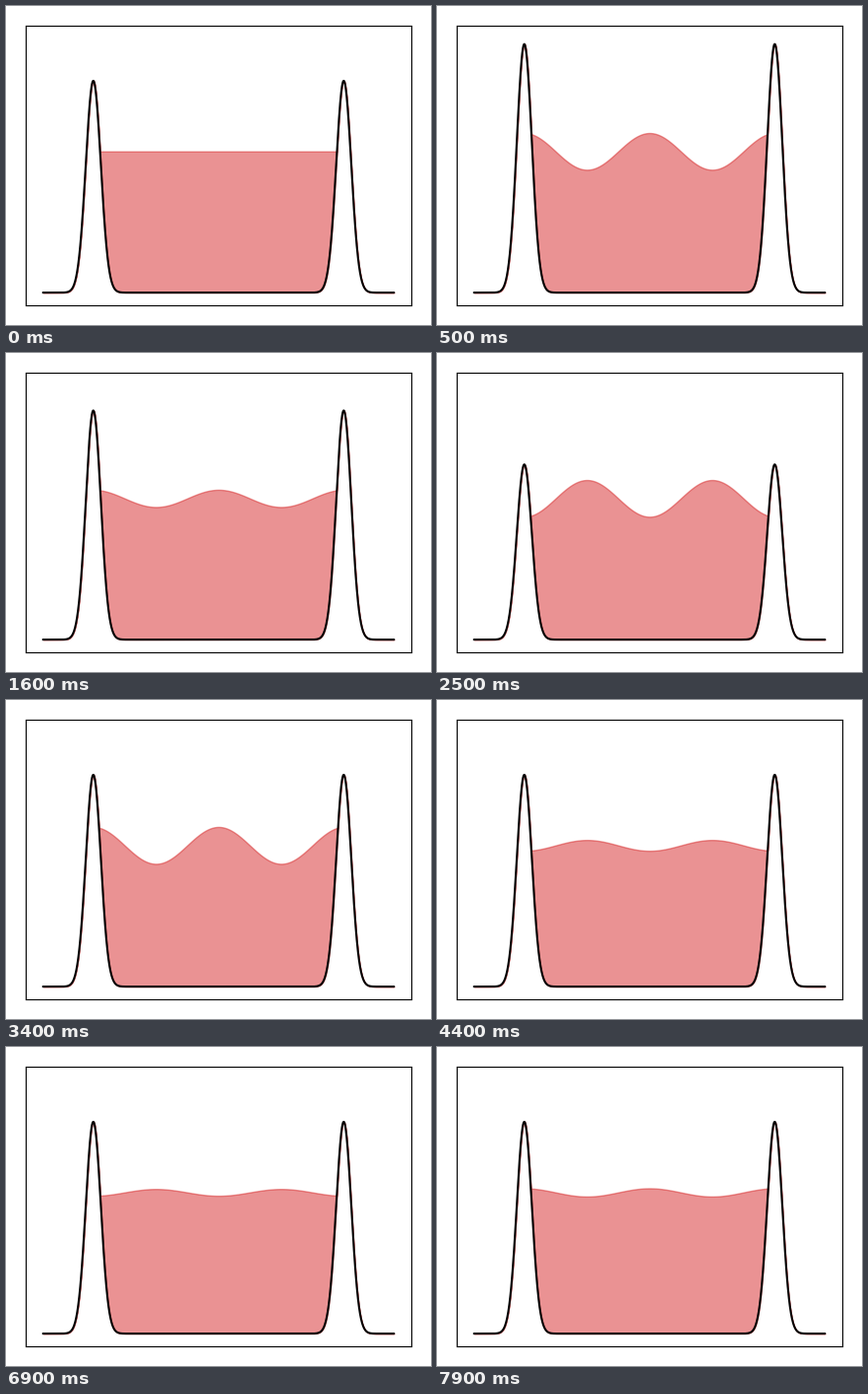
Animation of 432x324 px, one loop 8000 ms. Source, as a matplotlib script:

```python
import numpy as np
import matplotlib.pyplot as plt
from matplotlib.animation import FuncAnimation

W, H, DPI = 432, 324, 100
MARGIN = 20          # px around the axes
FRAMES, INTERVAL = 80, 100
PERIOD = 1.5         # s, drive and wave
DRIVE_END = 3.0      # s, two full periods
DECAY = 3.0          # s, damping after the drive stops
WALL, SIGMA = 1.5, 0.03
RIPPLE = 0.15

x = np.linspace(-0.2, 1.2, 1401)
walls = sum(np.exp(-((x - c) / SIGMA) ** 2 / 2) for c in (0, 1))
inside = (x > 0) & (x < 1)
mode = np.cos(4 * np.pi * x)


def state(t):
    """Potential and filled level at time t in seconds."""
    swing = np.sin(2 * np.pi * t / PERIOD)
    driven = t < DRIVE_END
    potential = WALL * walls * (1 + 0.2 * swing * driven)
    damping = 1 if driven else np.exp(-(t - DRIVE_END) / DECAY)
    level = 1 + RIPPLE * damping * swing * mode
    return potential, np.where(inside, np.maximum(potential, level), potential)


def outline(low, high):
    return np.column_stack([np.r_[x, x[::-1]], np.r_[low, high[::-1]]])


fig = plt.figure(figsize=(W / DPI, H / DPI), dpi=DPI, facecolor="white")
ax = fig.add_axes([MARGIN / W, MARGIN / H, 1 - 2 * MARGIN / W, 1 - 2 * MARGIN / H])
ax.set(xlim=(-0.27, 1.27), ylim=(-0.09, 1.89), xticks=[], yticks=[])

potential, top = state(0)
fluid = ax.fill_between(x, potential, top, color="tab:red", alpha=0.5, lw=1)
line, = ax.plot(x, potential, color="black", lw=1.5)


def update(i):
    potential, top = state(i * INTERVAL / 1000)
    line.set_ydata(potential)
    fluid.set_verts([outline(potential, top)])
    return fluid, line


anim = FuncAnimation(fig, update, frames=FRAMES, interval=INTERVAL,
                     repeat=True, repeat_delay=0, blit=False)
plt.show()
```
